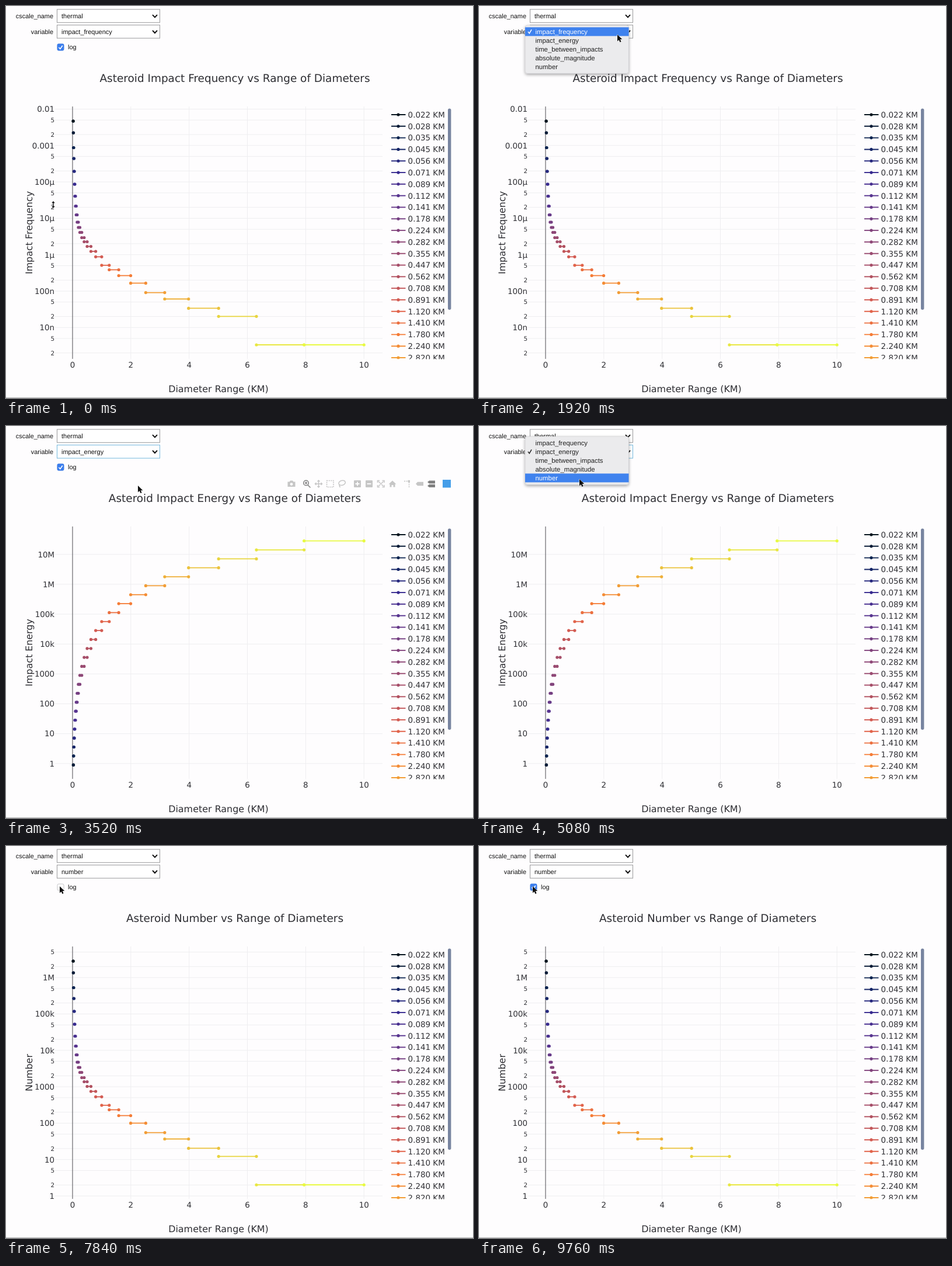
An HTML page for the animation above (10000 ms loop, 800 by 671 pixels).

```html
<!DOCTYPE html>
<html lang="en">
<head>
<meta charset="utf-8">
<title>Asteroid chart</title>
<style>
html, body { margin: 0; width: 100%; height: 100%; overflow: hidden; background: #fefdfe; }
svg { display: block; width: 800px; height: 671px; }
text { white-space: pre; text-rendering: geometricPrecision; }
.ui { font-family: "Liberation Sans", Arial, sans-serif; }
.plot { font-family: "DejaVu Sans", Verdana, sans-serif; fill: #2e2e33; }
</style>
</head>
<body>
<svg id="stage" viewBox="0 0 800 671" xmlns="http://www.w3.org/2000/svg"></svg>
<script>
const LOOP = 10000;
const OPTIONS = ['impact_frequency', 'impact_energy', 'time_between_impacts', 'absolute_magnitude', 'number'];
const AREA = { l: 84, r: 645, t: 172, b: 604 };

// ---------- helpers ----------
const line = (x1, y1, x2, y2, stroke, w = 1) =>
  `<line x1="${x1}" y1="${y1}" x2="${x2}" y2="${y2}" stroke="${stroke}" stroke-width="${w}"/>`;
const rect = (x, y, w, h, fill, extra = '') =>
  `<rect x="${x}" y="${y}" width="${w}" height="${h}" fill="${fill}" ${extra}/>`;
const dot = (x, y, fill) => `<circle cx="${x}" cy="${y}" r="2.6" fill="${fill}"/>`;
const path = (d, extra) => `<path d="${d}" ${extra}/>`;
// y is the middle of the capitals and digits
const text = (s, x, y, size, anchor = 'start', extra = '') =>
  `<text x="${x}" y="${y + size * .36}" font-size="${size}" text-anchor="${anchor}" ${extra}>${s}</text>`;
const group = (id, body, extra = '') => `<g id="${id}" ${extra}>${body}</g>`;

function si(v) {
  const units = [[1e6, 'M'], [1e4, 'k', 1e3], [1e-3, '', 1], [1e-6, 'µ'], [0, 'n', 1e-9]];
  const [from, unit, div = from] = units.find(u => v * 1.0001 >= u[0]);
  const m = v / div;
  return (m >= 10 ? Math.round(m) : Number(m.toPrecision(3))) + unit;
}

// ---------- data ----------
const COUNT = 27;
const edge = i => 10 ** ((i - 17) / 10);
const px = d => 114 + 49.92 * d;
const COUNTS_Y = [197, 217, 242.5, 261, 283, 305, 325.5, 342.5, 357.5, 370, 379, 387.5, 396.5, 403.5,
  411.5, 420, 429.3, 443.8, 451.5, 461.5, 474.4, 490.6, 501.5, 517.4, 531.3, 580, 580];
const energyY = i => 196.7 + 15.34 * (26 - i);

const STOPS = ['07161f', '0c2558', '32298f', '5a3590', '7b417f', '984a72',
  'b4525f', 'dc5f50', 'f57b36', 'f2a136', 'e8ce3e', 'e8fa43']
  .map(h => [0, 2, 4].map(k => parseInt(h.slice(k, k + 2), 16)));
function color(i) {
  const p = i / (COUNT - 1) * (STOPS.length - 1);
  const k = Math.min(Math.floor(p), STOPS.length - 2);
  return `rgb(${STOPS[k].map((c, j) => Math.round(c + (STOPS[k + 1][j] - c) * (p - k)))})`;
}
function name(i) {
  const d = 10 ** ((i - 16.5) / 10);
  return (d < 1 ? d.toFixed(3) : Number(d.toPrecision(3)).toFixed(2) + '0') + ' KM';
}

// log axis: pixel of 10^0 and pixels per decade
const logAxis = (zero, step) => ({ y: e => zero - e * step, value: y => 10 ** ((zero - y) / step) });
const freqAxis = logAxis(51.9, 62.3);
const energyAxis = logAxis(577.8, 51.15);
const numAxis = logAxis(599, 62.3);

function logTicks(axis, lo, hi, minor) {
  const out = [];
  for (let e = lo; e <= hi; e++) {
    out.push({ y: axis.y(e), label: si(10 ** e) });
    if (minor) for (const m of [2, 5]) out.push({ y: axis.y(e + Math.log10(m)), label: m, small: true });
  }
  return out.filter(k => k.y > AREA.t && k.y < AREA.b);
}

const TOP = numAxis.value(197);
const linY = v => 580 - 383 * v / TOP;
const CHARTS = {
  freq: { what: 'Impact Frequency', y: i => COUNTS_Y[i], axis: freqAxis, ticks: logTicks(freqAxis, -9, -2, true), first: 0 },
  energy: { what: 'Impact Energy', y: energyY, axis: energyAxis, ticks: logTicks(energyAxis, 0, 7), first: 1 },
  number: { what: 'Number', y: i => COUNTS_Y[i], axis: numAxis, ticks: logTicks(numAxis, 0, 6, true), first: 0 },
  linear: {
    what: 'Number', y: i => linY(numAxis.value(COUNTS_Y[i])), first: 0, zero: true,
    ticks: [0, .5, 1, 1.5, 2, 2.5].map(m => ({ y: linY(m * 1e6), label: m ? m + 'M' : '0' }))
  }
};

function chart(id, c) {
  let s = '';
  for (const k of c.ticks) {
    s += line(AREA.l, k.y, AREA.r, k.y, '#eeeef0');
    s += text(k.label, 83, k.y, k.small ? 10.4 : 13.4, 'end');
  }
  for (let d = 2; d <= 10; d += 2) s += line(px(d), AREA.t, px(d), AREA.b, '#eeeef0');
  s += line(114, AREA.t, 114, AREA.b, '#66666a', 1.2);
  if (c.zero) s += line(AREA.l, 580, AREA.r, 580, '#66666a', 1.2);
  for (let i = c.first; i < COUNT; i++) {
    const a = px(edge(i)), b = px(edge(i + 1)), y = c.y(i), f = color(i);
    s += line(a, y, b, y, f, 1.8) + dot(a, y, f) + dot(b, y, f);
  }
  s += text(`Asteroid ${c.what} vs Range of Diameters`, 392, 123.7, 18.47, 'middle');
  s += text(c.what, 0, 0, 15.9, 'middle', 'transform="translate(39.4 388) rotate(-90)"');
  return group(id, s, 'class="plot"');
}

function frame() {
  let s = '';
  for (let d = 0; d <= 10; d += 2) s += text(d, px(d), 614.3, 13.4, 'middle');
  s += text('Diameter Range (KM)', 364, 655, 15.95, 'middle');
  let rows = '';
  for (let i = 0; i < 22; i++) {
    const y = 186 + 19.81 * i, f = color(i);
    rows += line(660, y, 684.5, y, f, 1.9) + dot(672, y, f) + text(name(i), 688.6, y, 13.45);
  }
  return group('frame', s + `<g clip-path="url(#legend)">${rows}</g>` +
    rect(757, 175.5, 5.4, 344.5, '#7884a0', 'rx="2.7"'), 'class="plot"');
}

// ---------- widgets ----------
const selectBox = (y, id) => rect(87.5, y, 176, 22.5, '#fff', `stroke="#9a9a9c" id="${id}"`) +
  path(`M251 ${y + 9.3}l4 4.3l4 -4.3`, 'fill="none" stroke="#111" stroke-width="2"');

function widgets() {
  return group('widgets',
    text('cscale_name', 81, 17.5, 10.9, 'end') + text('variable', 81, 44, 10.9, 'end') +
    selectBox(5.8, 'scale') + selectBox(32.6, 'picker') +
    text('thermal', 95, 17.5, 11) + text('', 95, 44, 11, 'start', 'id="choice"') +
    text('log', 106, 70.3, 10.9) +
    rect(88, 65, 11, 11, '#fff', 'rx="2.2" stroke="#b8b8bb" stroke-width=".8"') +
    group('tick', rect(87.6, 64.6, 11.8, 11.8, '#3b7eee', 'rx="2.4"') +
      path('M90.4 70.8l2.4 2.7l4 -5.8', 'fill="none" stroke="#fff" stroke-width="1.6"')),
    'class="ui" fill="#111"');
}

function modebar() {
  const grey = '#444', st = `fill="none" stroke="${grey}" stroke-width="1.5"`;
  const dim = s => `<g opacity=".34">${s}</g>`, on = s => `<g opacity=".78">${s}</g>`;
  const tag = (x, y, w, h) => path(`M${x} ${y}l3 ${-h / 2}h${w}v${h}h${-w}z`, `fill="${grey}"`);
  const block = (x, sign) => rect(x, 93, 12, 12, grey, 'rx="1"') + path(sign, 'stroke="#fff" stroke-width="1.8"');
  const s =
    dim(path('M482.5 95.5h3l1.5 -2h4l1.5 2h3v8.5h-13z', `fill="${grey}"`) + '<circle cx="489" cy="99.6" r="2.4" fill="#fff"/>') +
    on(`<circle cx="514" cy="97.5" r="4.3" ${st}/>` + path('M517 101l4 4', `${st} stroke-linecap="round"`) +
      path('M511.8 97.5h4.4M514 95.3v4.4', st)) +
    dim(path('M530 99h11M535.5 93v12M533.5 95l2 -2l2 2M533.5 103l2 2l2 -2M531.5 97l-2 2l2 2M539.5 97l2 2l-2 2', st)) +
    dim(rect(549.5, 93.5, 11.5, 11, 'none', `stroke="${grey}" stroke-width="1.6" stroke-dasharray="2 1.4"`)) +
    dim(`<ellipse cx="575.5" cy="97.5" rx="5.8" ry="4" ${st} transform="rotate(-15 575 97)"/>` + path('M571.5 100q-1 2 1 5', st)) +
    dim(block(596, 'M602 95.5v7M598.5 99h7') + block(616, 'M618.5 99h7')) +
    dim(path('M636.5 97v-3.5h3.5M644.5 93.5h3.5v3.5M648 101v3.5h-3.5M640 104.5h-3.5v-3.5M638 95l8.5 8M646.5 95l-8.5 8', st)) +
    dim(path('M655.5 99.5l6.5 -6l6.5 6h-2v5h-3v-3.5h-3v3.5h-3v-5z', `fill="${grey}"`)) +
    dim(path('M682 94.5h7M690.5 96v9', `${st} stroke-dasharray="2 1.5"`) + rect(688.5, 92.8, 3.5, 3.5, grey)) +
    dim(tag(702, 99, 10, 6.5)) +
    on(tag(722, 96, 10, 5) + tag(722, 102.5, 10, 5)) +
    rect(748, 92, 14, 13.5, '#2b91e6');
  return group('modebar', s);
}

function menu() {
  let s = rect(79, 0, 177.5, 82.5, '#ebebed', 'rx="4" stroke="#c4c4c8" stroke-width=".6" filter="url(#shadow)"');
  s += rect(79, 0, 177.5, 15, '#3f82ee', 'id="bar"');
  OPTIONS.forEach((o, i) => { s += text(o, 96.5, 11 + 15 * i, 11.35, 'start', `id="opt${i}"`); });
  s += path('M84 11l2.3 3l3.7 -6.5', 'id="mark" fill="none" stroke-width="1.5"');
  return group('menu', s, 'class="ui"');
}

const outline = 'fill="#111" stroke="#fff" stroke-width="1" paint-order="stroke"';
const pointers =
  path('M0 0V11.4L2.6 8.9L4.5 13L6.6 12.1L4.8 8.1H8.3Z', `id="arrow" ${outline}`) +
  group('cross', path('M-6 0H6M0 -6V6', 'stroke="#fff" stroke-width="3"') + path('M-5.5 0H5.5M0 -5.5V5.5', 'stroke="#222" stroke-width="1.2"')) +
  path('M0 -6L2.8 -2.8H.7V2.8H2.8L0 6L-2.8 2.8H-.7V-2.8H-2.8Z', `id="resize" ${outline}`);

document.getElementById('stage').innerHTML =
  `<defs><clipPath id="legend"><rect x="650" y="170" width="106" height="434.5"/></clipPath>
   <filter id="shadow" x="-10%" y="-10%" width="120%" height="130%">
   <feDropShadow dx="0" dy="2" stdDeviation="2.5" flood-color="#000" flood-opacity=".35"/></filter></defs>` +
  rect(0, 0, 800, 671, '#fefdfe') + line(0, 670.5, 800, 670.5, '#b4b4b6') +
  Object.entries(CHARTS).map(([id, c]) => chart(id, c)).join('') + frame() + modebar() +
  group('hover', '', 'class="ui"') + widgets() + menu() + group('pointer', pointers);

const el = id => document.getElementById(id);
const show = (id, on) => el(id).setAttribute('display', on ? 'inline' : 'none');

// ---------- timeline ----------
const MENUS = [{ open: 1720, close: 2480, selected: 0 }, { open: 4280, close: 5440, selected: 1 }];
const FADE = 160;
const PATH = [
  [0, 81, 340], [40, 81, 340], [560, 190, 432], [880, 273, 471], [1060, 318, 462], [1380, 275, 180],
  [1640, 237, 49], [2120, 237, 49], [2400, 232, 62], [3340, 232, 62], [3420, 227, 100], [3520, 226, 102],
  [3760, 226, 128], [3920, 220, 122], [4200, 190, 44], [4400, 190, 44], [5000, 172, 91], [5440, 172, 91],
  [5600, 190, 84], [5900, 214, 85], [6400, 214, 85], [6520, 222, 104], [7280, 222, 104], [7680, 92, 69],
  [8400, 92, 69], [8660, 150, 126], [8800, 154, 130], [9060, 92, 69], [LOOP, 92, 69]
];
function pointerAt(t) {
  const k = Math.max(1, PATH.findIndex(p => p[0] > t));
  const [t0, x0, y0] = PATH[k - 1], [t1, x1, y1] = PATH[k];
  const f = (t - t0) / (t1 - t0);
  return { x: x0 + (x1 - x0) * f, y: y0 + (y1 - y0) * f };
}
const menuAt = t => MENUS.find(m => t >= m.open && t < m.close + FADE);
const inArea = p => p.x > 88 && p.x < AREA.r && p.y > AREA.t && p.y < AREA.b;
const chartAt = t => t < 2920 ? 'freq' : t < 6000 ? 'energy' : t >= 8160 && t < 9440 ? 'linear' : 'number';

// share of the last moments that the pointer spent over the chart
function barOpacity(t) {
  let n = 0;
  for (let k = 0; k < 16; k++) {
    const s = t - k * 10;
    if (s > 40 && !menuAt(s) && pointerAt(s).y > 86) n++;
  }
  return n / 16;
}

const textWidth = s => [...String(s)].reduce((w, c) => w + (c === '.' ? .278 : .556), 0) * 10.75;

function hoverAt(t) {
  const c = CHARTS[chartAt(t)], p = pointerAt(Math.max(0, t - 100));
  if (t < 140 || !c.axis || !inArea(p) || !inArea(pointerAt(t))) return '';
  let near = c.first;
  for (let i = c.first; i <= COUNT; i++)
    if (Math.abs(px(edge(i)) - p.x) < Math.abs(px(edge(near)) - p.x)) near = i;
  const x = px(edge(near));
  if (Math.abs(x - p.x) > 20) return '';

  const tags = [near - 1, near].filter(i => i >= c.first && i < COUNT).map(i => ({ i, y: c.y(i), at: c.y(i) }));
  if (tags.length > 1) {
    const gap = 17.3 - Math.abs(tags[1].y - tags[0].y);
    if (gap > 0) {
      const dir = tags[1].y >= tags[0].y ? 1 : -1;
      tags[0].at -= dir * gap / 2;
      tags[1].at += dir * gap / 2;
    }
  }
  let s = '';
  for (const { i, y, at } of tags) {
    const label = si(c.axis.value(y)), w = textWidth(label) + 7, f = color(i);
    s += path(`M${x + 1.5} ${y}L${x + 7} ${at - 5}V${at - 8.6}h${w}v17.2h${-w}V${at + 5}Z`, `fill="${f}" stroke="#444"`);
    s += text(label, x + 10.5, at, 10.75, 'start', 'fill="#3c3c3c"');
    s += text(name(i), x + w + 9, at, 10.75, 'start', `fill="${f}"`);
  }
  const label = Number(edge(near).toPrecision(3)), w = textWidth(label) / 2 + 2.5;
  s += path(`M${x} 604.5l5 5H${x + w}V627H${x - w}V609.5H${x - 5}Z`, 'fill="#3c3c40"');
  return s + text(label, x, 618.4, 10.75, 'middle', 'fill="#fff"');
}

function drawMenu(t, p) {
  const m = menuAt(t);
  show('menu', m);
  if (!m) return;
  const top = 32.9 - 15 * m.selected;
  const over = Math.max(0, Math.min(4, Math.floor((p.y - top - 3.5) / 15)));
  el('menu').setAttribute('transform', `translate(0 ${top})`);
  el('menu').setAttribute('opacity', t < m.close ? 1 : 1 - (t - m.close) / FADE);
  el('bar').setAttribute('y', 3.5 + 15 * over);
  OPTIONS.forEach((o, i) => el('opt' + i).setAttribute('fill', i === over ? '#fff' : '#222'));
  el('mark').setAttribute('transform', `translate(0 ${15 * m.selected})`);
  el('mark').setAttribute('stroke', over === m.selected ? '#fff' : '#222');
}

function draw(t) {
  const p = pointerAt(t), current = chartAt(t);
  for (const id in CHARTS) show(id, id === current);
  el('modebar').setAttribute('opacity', barOpacity(t));
  el('hover').innerHTML = hoverAt(t);
  el('choice').textContent = OPTIONS[t < 2480 ? 0 : t < 5440 ? 1 : 4];
  el('picker').setAttribute('stroke', t >= 2480 && t < 7760 ? '#74b8dc' : '#9a9a9c');
  show('tick', t < 7800 || t >= 9120);
  drawMenu(t, p);

  const kind = inArea(p) ? 'cross' : p.x < 88 && p.y > AREA.t ? 'resize' : 'arrow';
  for (const id of ['arrow', 'cross', 'resize']) show(id, id === kind);
  el('pointer').setAttribute('transform', `translate(${p.x} ${p.y})`);
}

function tick() {
  draw(performance.now() % LOOP);
  requestAnimationFrame(tick);
}
tick();
</script>
</body>
</html>
```
